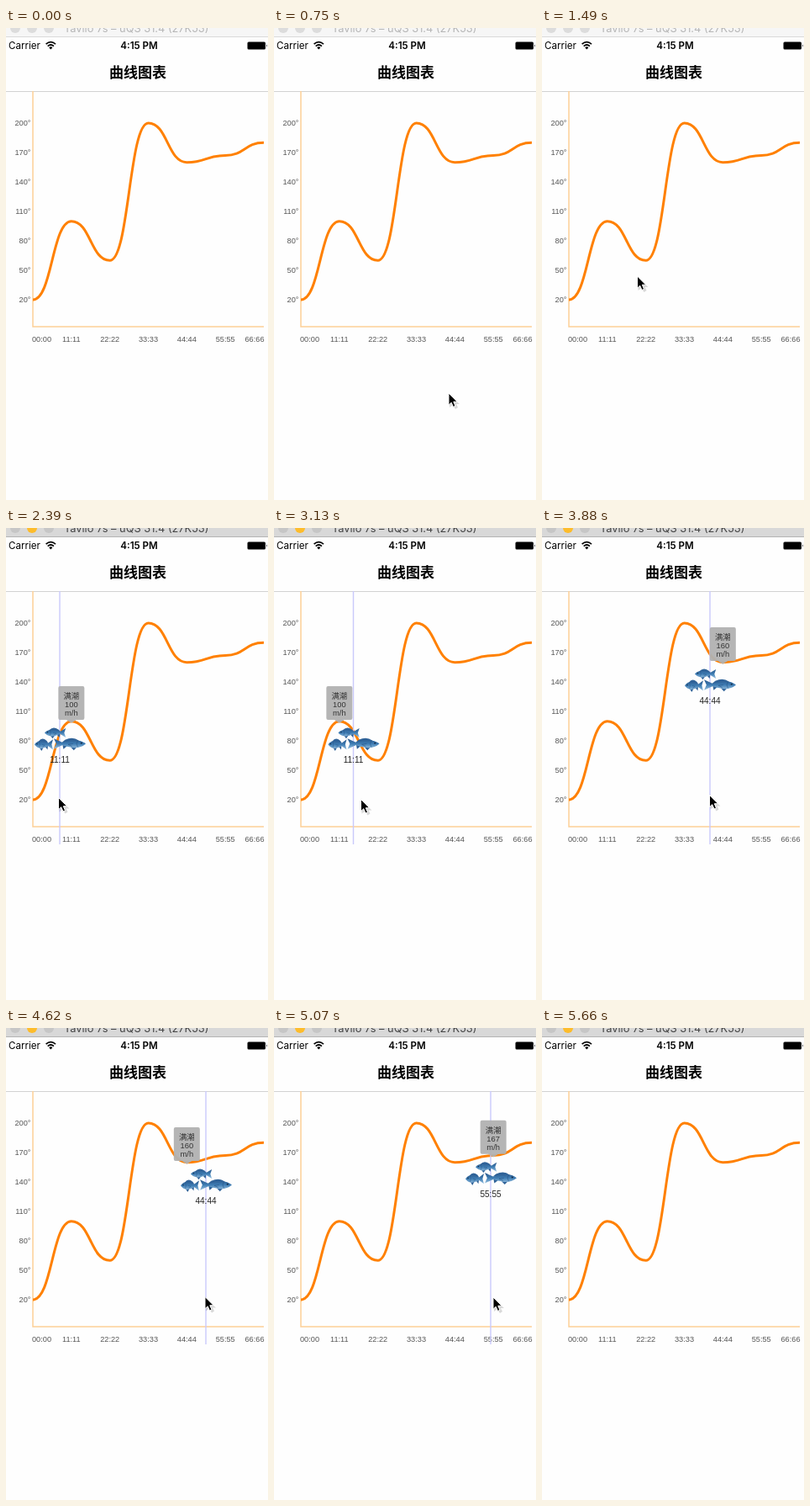
Recreate the animation shown at these times as an HTML page. Size 312 by 561 pixels, loop 6260 ms.

```html
<!DOCTYPE html>
<html lang="zh">
<head>
<meta charset="utf-8">
<style>
html, body { margin: 0; width: 100%; height: 100%; overflow: hidden; background: #fefefe; }
svg { display: block; width: 312px; height: 561px; }
text { font-family: "Liberation Sans", "Noto Sans CJK SC", "Noto Sans CJK", sans-serif; }
.ui { font-family: Inter, Roboto, sans-serif; }
.axis { font-size: 9.2px; fill: #555; }
.mid { text-anchor: middle; }
.end { text-anchor: end; }
#bar { fill: #f6f6f6; }
#edge { fill: #dadada; }
#bar, #edge { shape-rendering: crispEdges; }
.dot { fill: #dcdcdc; }
#caption { font-size: 12.8px; fill: #b6b6b6; }
.active #bar { fill: #d8d8d8; }
.active #edge { fill: #b4b4b4; }
.active .dot { fill: #c6c6c6; }
.active #amber { fill: #fdbc2c; }
.active #caption { fill: #444; }
</style>
</head>
<body>
<svg id="stage" viewBox="0 0 312 561">
  <defs>
    <linearGradient id="scales" x2="0" y2="1">
      <stop stop-color="#28568a"/>
      <stop offset=".5" stop-color="#3f7db4"/>
      <stop offset="1" stop-color="#9cc4e2"/>
    </linearGradient>
    <clipPath id="plot"><path d="M0 75H312V376H0z"/></clipPath>
    <g id="fish">
      <path fill="#2f6298" d="M9 5Q16 -2 26 4L30 8H9zM11 15L15 20 19 15zM23 13L28 18 29 12z"/>
      <path fill="url(#scales)" d="M0 10Q9 0 29 8L40 2 37 10 40 18 29 12Q10 21 0 10z"/>
      <path fill="none" stroke="#234e7e" stroke-opacity=".6" d="M10 5Q13 10 10 15M16 10l6 1-5 3"/>
      <circle cx="5.5" cy="9" r="1.2" fill="#142c48"/>
    </g>
  </defs>

  <path id="bar" d="M0 0H312V10H0z"/>
  <path id="edge" d="M0 10H312V11H0z"/>
  <circle class="dot" cx="11" r="6"/>
  <circle class="dot" id="amber" cx="31" r="6"/>
  <circle class="dot" cx="51" r="6"/>
  <text id="caption" class="ui" x="69" y="5">Tavilo 7s – uQS 31.4 (27K53)</text>

  <text class="ui" x="3" y="25.2" font-size="11.6">Carrier</text>
  <g fill="none" stroke="#000" stroke-width="1.7">
    <path d="M47.6 19.2Q53.3 14.2 59 19.2M49.7 21.6Q53.3 18.4 56.9 21.6"/>
    <path fill="#000" stroke="none" d="M51.2 23.2Q53.3 21.4 55.4 23.2L53.3 25.6z"/>
  </g>
  <text class="ui mid" x="158.5" y="25.2" font-size="11.6" font-weight="600">4:15 PM</text>
  <rect x="287.5" y="16.5" width="21.5" height="9" rx="1.5"/>
  <path d="M310 19.3Q311.6 21 310 22.7z"/>
  <text class="mid" x="157" y="59" font-size="17" font-weight="600">曲线图表</text>
  <path d="M0 75H312V76H0z" fill="#d2d2d2"/>

  <g id="labels"></g>
  <path d="M32 75V355H307" fill="none" stroke="#fdcf96" stroke-width="1.5"/>
  <path id="curve" fill="none" stroke="#ff8000" stroke-width="3"/>

  <g id="touch" clip-path="url(#plot)">
    <path id="guide" d="M0 75V376" stroke="#c9c9fb" stroke-width="1.4"/>
    <g id="tip">
      <path d="M-13.5 -41.7H13.5Q15.5 -41.7 15.5 -39.7V-3.7Q15.5 -1.7 13.5 -1.7H6L0 2 -6 -1.7H-13.5Q-15.5 -1.7 -15.5 -3.7V-39.7Q-15.5 -41.7 -13.5 -41.7z" fill="#b1b1b1" fill-opacity=".95"/>
      <g class="mid" font-size="9.4" fill="#333">
        <text y="-26.7">满潮</text>
        <text id="value" y="-16.2"></text>
        <text y="-6.4">m/h</text>
      </g>
    </g>
    <g id="school">
      <use href="#fish" transform="translate(-18 7) scale(.63 .68)"/>
      <use href="#fish" transform="translate(-30 20) scale(.55 .77)"/>
      <use href="#fish" transform="translate(31 19) scale(-.95 .78)"/>
      <text id="hour" class="mid" y="49" font-size="10" fill="#222"></text>
    </g>
  </g>
  <g id="cursor">
    <path d="M1 2V17L5 14 8 19 11 17 9 13H13z" fill="#000" opacity=".15"/>
    <path d="M0 0V14.2L3.2 11.2 5.5 16.4 8 15.3 5.8 10.2H10.2z" stroke="#fff" stroke-width="1"/>
  </g>
</svg>
<script>
const $ = id => document.getElementById(id);
const values = [20, 100, 60, 200, 160, 167, 180];
const hours = values.map((_, i) => `${i}${i}:${i}${i}`);
const step = 275 / 6;
const px = i => 32 + i * step;
const py = v => 323 - (v - 20) * 35 / 30;

let labels = "";
for (let v = 20; v <= 200; v += 30)
  labels += `<text class="axis end" x="29.5" y="${py(v) + 3.3}">${v}°</text>`;
hours.forEach((h, i) => {
  const [cls, x] = i == 0 ? ["", 31] : i == 6 ? ["end", 307.5] : ["mid", px(i)];
  labels += `<text class="axis ${cls}" x="${x}" y="373.2">${h}</text>`;
});
$("labels").innerHTML = labels;

$("curve").setAttribute("d", values.reduce((d, v, i) => {
  if (!i) return `M${px(0)} ${py(v)}`;
  const mid = px(i - .5);
  return `${d}C${mid} ${py(values[i - 1])} ${mid} ${py(v)} ${px(i)} ${py(v)}`;
}, ""));

// time, pointer x, pointer y, guide x (absent while not pressed)
const poses = [
  [0], [450, 214, 500], [600, 212, 473], [750, 208, 434], [890, 203, 390],
  [1040, 196, 346], [1190, 190, 314], [1490, 113.5, 295],
  [1640, 116, 297, 117], [1790, 110, 302, 112], [1940, 97, 308, 100],
  [2090, 82, 314, 86], [2240, 69, 319, 72], [2390, 62.5, 320.5, 64],
  [2830, 70, 321, 66], [2980, 86, 322, 80], [3130, 103.5, 322.5, 94.5],
  [3280, 118, 322, 109], [3430, 135, 321, 124], [3580, 158, 320, 142],
  [3730, 189, 318, 166], [3880, 199.5, 317.5, 200], [4030, 206, 318, 206],
  [4180, 213, 318, 213], [4330, 221, 319, 220], [4480, 230, 319, 229],
  [4620, 237, 319.5, 238], [4770, 247, 320, 246], [4920, 256, 320, 254],
  [5070, 261, 320, 258], [5220, 264, 320, 261], [5370, 265, 320, 262.5],
  [5510, 266, 320, 263], [5660]
];

const show = (el, on) => el.style.display = on ? "" : "none";
const move = (el, x, y) => el.setAttribute("transform", `translate(${x} ${y})`);

function draw(now) {
  const t = now % 6260;
  const [, x, y, guide] = poses.findLast(p => p[0] <= t);
  $("stage").classList.toggle("active", t >= 1640);
  show($("cursor"), x);
  show($("touch"), guide);
  if (x) move($("cursor"), x, y);
  if (guide) {
    const i = Math.round((guide - 32) / step), top = py(values[i]);
    move($("guide"), guide, 0);
    move($("tip"), px(i), top);
    move($("school"), guide, top);
    $("value").textContent = values[i];
    $("hour").textContent = hours[i];
  }
}

const start = performance.now();
function loop() {
  draw(performance.now() - start);
  requestAnimationFrame(loop);
}
loop();
</script>
</body>
</html>
```
